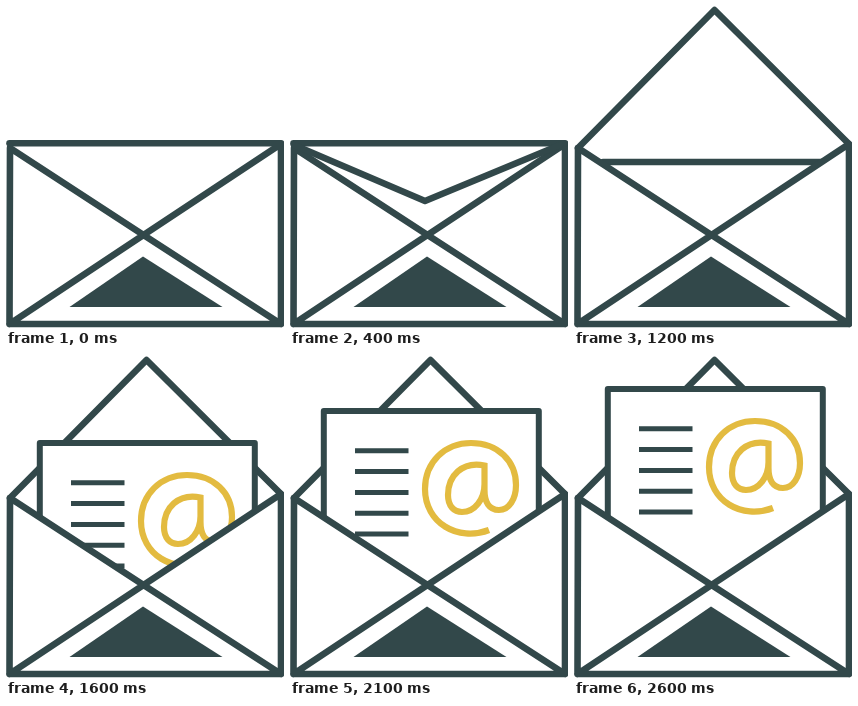
An HTML page that plays this animation: 278x322 px, repeating every 2.8 s.

```html
<!DOCTYPE html>
<html lang="en">
<head>
<meta charset="utf-8">
<title>Opening envelope</title>
<style>
  html, body { margin: 0; width: 100%; height: 100%; overflow: hidden; background: #fff; }
  svg { display: block; width: 100%; height: 100%; }
  .ink { fill: none; stroke: #32484a; stroke-width: 6.6; stroke-linecap: round; stroke-linejoin: round; }
  .white { fill: #fff; }
  .rules { fill: none; stroke: #32484a; stroke-width: 5; }
  .at { fill: none; stroke: #e3bb40; stroke-width: 6.2; }
</style>
</head>
<body>
<svg viewBox="0 0 278 322" preserveAspectRatio="none">
  <path id="flapOpen" class="ink" d="M4 142 L140.5 4 L275 138"/>
  <path id="paperEdge" class="ink" d="M29 156 H249"/>

  <g id="letter">
    <rect class="ink white" x="33.8" y="33" width="215" height="200" style="fill:#fff;stroke-width:6"/>
    <path class="rules" d="M65 72.7h53.5 M65 93.6h53.5 M65 114.4h53.5 M65 135.2h53.5 M65 156h53.5"/>
    <path class="at" d="M199 152 C168 164 135 145 135 111
      C135 84 155 65 181 65 C208 65 226 83 226 107
      C226 121 219 132 209 132 C199 132 194.5 124 194.5 112
      V87.5 C172 83 158 98 158 117 C158 128 164 134 172 134
      C185 134 194.5 121 194.5 106"/>
  </g>

  <path class="white" d="M4 142 L137 229 L275 138 V322 H4 Z"/>
  <path class="ink" d="M4 142 L137.5 229 L275 138 V318 H3.5 Z M3.5 318 L137.5 229 L275 318"/>
  <path d="M137 250.5 L216.5 301 H63.5 Z" fill="#32484a"/>

  <path id="rim" class="ink" d="M3.5 137.3 H275"/>
  <path id="flapDown" class="ink" d="M4 139 L135 195 L270 139"/>
  <path id="flapUp" class="ink" d="M4 137 L135 80.5 L271 137"/>
</svg>
<script>
  const LOOP = 2800;

  // Each step is [time in ms, value], held until the next one.
  function hold(id, property, steps) {
    const frames = steps.map(([time, value]) => ({
      offset: time / LOOP, [property]: value, easing: 'step-end'
    }));
    frames.push({ offset: 1, [property]: steps[steps.length - 1][1] });
    document.getElementById(id).animate(frames, { duration: LOOP, iterations: Infinity });
  }

  function showBetween(id, start, end) {
    const steps = [[start, 1]];
    if (start > 0) steps.unshift([0, 0]);
    if (end < LOOP) steps.push([end, 0]);
    hold(id, 'opacity', steps);
  }

  showBetween('rim', 0, 1200);
  showBetween('flapDown', 400, 800);
  showBetween('flapUp', 800, 1200);
  showBetween('flapOpen', 1200, LOOP);
  showBetween('paperEdge', 1200, 1600);
  showBetween('letter', 1600, LOOP);

  hold('letter', 'transform', [
    [0, 'translateY(54px)'],
    [1800, 'translateY(22px)'],
    [2300, 'translateY(0px)']
  ]);
</script>
</body>
</html>
```
